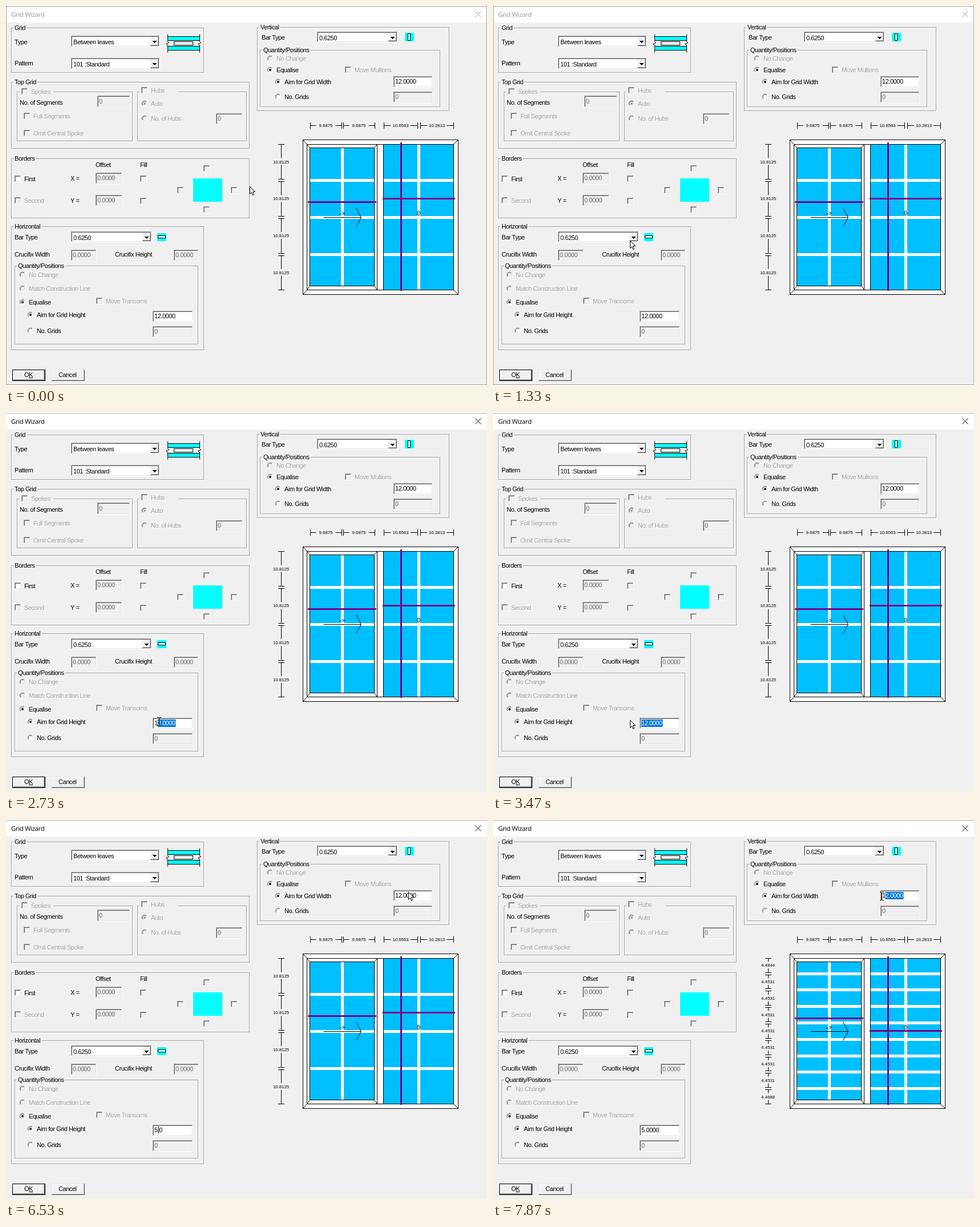
An HTML page with a canvas that plays this animation: 843x664 px, repeating every 8 s.

```html
<!DOCTYPE html>
<html lang="en">
<head>
<meta charset="utf-8">
<title>Grid Wizard</title>
<style>
  html, body { margin: 0; width: 100%; height: 100%; overflow: hidden; background: #f0f0f0; }
  canvas { display: block; }
</style>
</head>
<body>
<canvas id="stage" width="843" height="664"></canvas>
<script>
const ctx = document.getElementById('stage').getContext('2d');
const LOOP = 8000, STEP = 200 / 3;
const FACE = '#f0f0f0', GREY = '#a0a0a0', DARK = '#696969', LIGHT = '#e3e3e3';
const CYAN = '#00ffff', GLASS = '#00bfff', PURPLE = '#800080';
const UI_FONT = '11px "Liberation Sans", sans-serif';

// Cursor keys: time, x, y, shape ("I" is the text beam)
const cursorKeys = [
  [0, 427, 316], [467, 427, 316], [733, 385, 401], [1133, 236, 445], [1333, 240, 411],
  [1400, 240, 411], [2067, 281, 546], [2200, 293, 543], [2400, 293, 543],
  [2467, 299, 540, 'I'], [2933, 244, 540, 'I'], [3467, 240, 538],
  [6000, 240, 538], [6200, 420, 370], [6400, 655, 165], [6533, 705, 126], [6600, 705, 126],
  [6933, 723, 119], [7333, 719, 130], [7400, 721, 133, 'I'], [7467, 721, 133, 'I'],
  [7733, 691, 133, 'I'], [7867, 681, 133, 'I'], [8000, 681, 133, 'I']
];

function cursorAt(t) {
  const time = Math.floor((t + 5) / STEP) * STEP + 0.5;
  let i = 0;
  while (i < cursorKeys.length - 2 && time >= cursorKeys[i + 1][0]) i++;
  const [t0, x0, y0, shape] = cursorKeys[i], [t1, x1, y1, nextShape] = cursorKeys[i + 1];
  const k = shape === nextShape ? Math.min(1, (time - t0) / (t1 - t0)) : 0;
  return { x: Math.round(x0 + (x1 - x0) * k), y: Math.round(y0 + (y1 - y0) * k), beam: shape === 'I' };
}

function rect(x, y, w, h, color) {
  ctx.fillStyle = color;
  ctx.fillRect(x, y, w, h);
}
function path(points, stroke, fill) {
  ctx.beginPath();
  points.forEach(([x, y]) => ctx.lineTo(x + 0.5, y + 0.5));
  if (fill) { ctx.closePath(); ctx.fillStyle = fill; ctx.fill(); }
  if (stroke) { ctx.strokeStyle = stroke; ctx.lineWidth = 1; ctx.stroke(); }
}
function frame(x0, y0, x1, y1, color, fill) {
  if (fill) rect(x0, y0, x1 - x0, y1 - y0, fill);
  ctx.strokeStyle = color;
  ctx.lineWidth = 1;
  ctx.strokeRect(x0 + 0.5, y0 + 0.5, x1 - x0, y1 - y0);
}
function text(str, x, midY, color = '#000', font = UI_FONT, spacing = -0.45) {
  ctx.font = font;
  ctx.letterSpacing = spacing + 'px';
  ctx.fillStyle = color;
  ctx.fillText(str, x, midY + 4);
}
function label(str, x, midY, disabled) {
  if (disabled) text(str, x + 1, midY + 1, '#fff');
  text(str, x, midY, disabled ? GREY : '#000');
}
function bevel(x0, y0, x1, y1, outer, inner, outerLow, innerLow, fill) {
  const w = x1 - x0, h = y1 - y0;
  rect(x0, y0, w, h, outerLow);
  rect(x0, y0, w - 1, h - 1, outer);
  rect(x0 + 1, y0 + 1, w - 2, h - 2, innerLow);
  rect(x0 + 1, y0 + 1, w - 3, h - 3, inner);
  rect(x0 + 2, y0 + 2, w - 4, h - 4, fill);
}
const sunken = (x0, y0, x1, y1, fill) => bevel(x0, y0, x1, y1, GREY, DARK, '#fff', LIGHT, fill);
const raised = (x0, y0, x1, y1) => bevel(x0, y0, x1, y1, LIGHT, '#fff', DARK, GREY, FACE);

function group(title, x0, y0, x1, y1, titleX = x0 + 6) {
  frame(x0 + 1, y0 + 1, x1, y1, '#fff');
  frame(x0, y0, x1 - 1, y1 - 1, GREY);
  ctx.font = UI_FONT;
  ctx.letterSpacing = '-0.45px';
  rect(titleX - 2, y0 - 1, ctx.measureText(title).width + 4, 3, FACE);
  label(title, titleX, y0);
}
function edit(str, x0, y0, x1, y1, enabled, selectFrom = str.length) {
  sunken(x0, y0, x1, y1, enabled ? '#fff' : FACE);
  const x = x0 + 3, midY = Math.round((y0 + y1) / 2) - 1;
  text(str, x, midY, enabled ? '#000' : DARK);
  if (selectFrom >= str.length) return;
  const start = x + ctx.measureText(str.slice(0, selectFrom)).width;
  rect(start, midY - 6, ctx.measureText(str.slice(selectFrom)).width + 1, 13, '#0078d7');
  text(str.slice(selectFrom), start, midY, '#fff');
}
// First character covered when a drag reaches x
function selectionStart(str, textX, x) {
  ctx.font = UI_FONT;
  ctx.letterSpacing = '-0.45px';
  let i = 0;
  while (i < str.length && textX + ctx.measureText(str.slice(0, i + 1)).width - 3 < x) i++;
  return i;
}
function combo(str, x0, y0, x1, y1) {
  sunken(x0, y0, x1, y1, '#fff');
  text(str, x0 + 4, (y0 + y1) / 2 + 1);
  raised(x1 - 17, y0 + 2, x1 - 2, y1 - 2);
  const x = x1 - 10, y = Math.round((y0 + y1) / 2) - 1;
  for (let i = 0; i < 4; i++) rect(x - 3 + i, y + i, 7 - 2 * i, 1, '#000');
}
function check(x, y, str, enabled) {
  sunken(x, y, x + 12, y + 12, enabled ? '#fff' : FACE);
  if (str) label(str, x + 17, y + 6, !enabled);
}
function radio(x, y, str, on, disabled) {
  ctx.lineWidth = 1;
  const arc = (r, start, color) => {
    ctx.beginPath();
    ctx.arc(x, y, r, start, start + Math.PI);
    ctx.strokeStyle = color;
    ctx.stroke();
  };
  ctx.beginPath();
  ctx.arc(x, y, 5, 0, 7);
  ctx.fillStyle = disabled ? FACE : '#fff';
  ctx.fill();
  arc(5, Math.PI * 0.75, GREY);
  arc(4, Math.PI * 0.75, DARK);
  arc(5, -Math.PI / 4, '#fff');
  arc(4, -Math.PI / 4, LIGHT);
  if (on) {
    ctx.beginPath();
    ctx.arc(x, y, 2, 0, 7);
    ctx.fillStyle = disabled ? GREY : '#000';
    ctx.fill();
  }
  label(str, x + 11, y, disabled);
}

function drawTitleBar(active) {
  const ink = active ? '#000' : '#999';
  rect(0, 0, 843, 664, FACE);
  rect(0, 0, 843, 29, '#fff');
  text('Grid Wizard', 9, 15, ink, '11.5px "Open Sans", sans-serif', -0.4);
  path([[822, 9], [832, 19]], ink);
  path([[832, 9], [822, 19]], ink);
  if (active) rect(0, 0, 843, 1, '#b4b4b4');
  else frame(0, 0, 842, 663, '#a6a6a6');
}

function drawLeftForm(height) {
  group('Grid', 9, 38, 347, 117);
  label('Type', 15, 63);
  combo('Between leaves', 114, 52, 270, 72);
  label('Pattern', 15, 100);
  combo('101 :Standard', 114, 91, 270, 111);
  for (const y of [53, 70]) {
    rect(283, y, 56, 8, CYAN);
    rect(283, y, 56, 1, '#000');
    rect(283, y + 7, 56, 1, '#000');
  }
  frame(294, 62, 327, 68, '#000', '#fff');
  for (const x of [283, 339])
    path([[x, 49], [x, 62], [x + 2, 64], [x - 3, 66], [x, 68], [x, 81]], '#000');

  group('Top Grid', 9, 133, 427, 250);
  group('', 19, 150, 222, 237);
  rect(25, 149, 58, 3, FACE);
  check(27, 144, 'Spokes');
  label('No. of Segments', 24, 169);
  edit('0', 160, 157, 218, 178);
  check(31, 187, 'Full Segments');
  check(31, 217, 'Omit Central Spoke');
  group('', 230, 150, 422, 237);
  rect(236, 149, 66, 3, FACE);
  check(237, 142, 'Hubs');
  radio(243, 171, 'Auto', true, true);
  radio(243, 197, 'No. of Hubs', false, true);
  edit('0', 368, 188, 415, 208);

  group('Borders', 9, 267, 427, 372);
  label('Offset', 157, 278);
  label('Fill', 235, 278);
  check(15, 297, 'First', true);
  check(15, 335, 'Second');
  [['X =', 302], ['Y =', 341]].forEach(([name, y]) => {
    label(name, 113, y);
    edit('0.0000', 157, y - 10, 204, y + 10);
    check(235, y - 5);
  });
  rect(328, 302, 51, 41, CYAN);
  check(346, 279);
  check(300, 317);
  check(394, 317);
  check(346, 351);

  group('Horizontal', 9, 386, 347, 603);
  label('Bar Type', 15, 405);
  combo('0.6250', 114, 395, 256, 414);
  rect(265, 398, 16, 14, CYAN);
  frame(266, 402, 279, 406, '#000', '#fff');
  label('Crucifix Width', 15, 435);
  edit('0.0000', 114, 427, 159, 447);
  label('Crucifix Height', 191, 435);
  edit('0.0000', 294, 427, 338, 447);
  group('Quantity/Positions', 15, 455, 337, 593);
  radio(29, 471, 'No Change', false, true);
  radio(29, 495, 'Match Construction Line', false, true);
  radio(29, 519, 'Equalise', true);
  check(158, 511, 'Move Transoms');
  radio(43, 541, 'Aim for Grid Height', true);
  edit(height.str, 257, 534, 328, 554, true, height.selectFrom);
  if (height.caret) rect(267, 537, 1, 12, '#000');
  radio(43, 569, 'No. Grids', false);
  edit('0', 257, 561, 328, 581);

  rect(11, 637, 58, 20, '#000');
  raised(12, 638, 68, 656);
  text('OK', 32, 646);
  rect(40, 651, 7, 1, '#000');
  raised(80, 637, 138, 657);
  text('Cancel', 92, 646);
}

function drawVerticalForm(widthSelect) {
  group('Vertical', 440, 37, 777, 184);
  label('Bar Type', 448, 55);
  combo('0.6250', 545, 45, 687, 64);
  rect(699, 47, 16, 15, CYAN);
  frame(704, 48, 708, 60, '#000', '#fff');
  group('Quantity/Positions', 445, 77, 761, 177);
  radio(463, 92, 'No Change', false, true);
  radio(463, 112, 'Equalise', true);
  check(594, 106, 'Move Mullions');
  radio(477, 133, 'Aim for Grid Width', true);
  edit('12.0000', 679, 123, 748, 143, true, widthSelect);
  radio(477, 159, 'No. Grids', false);
  edit('0', 679, 150, 748, 170);
}

function dimension(str, from, to, vertical) {
  const mid = (from + to) / 2, gap = vertical ? 6 : 17;
  const bar = (pos, size, cross, thick) => vertical
    ? rect(482 - cross, pos, thick, size, '#000')
    : rect(pos, 209 - cross, size, thick, '#000');
  for (const end of [from, to]) bar(Math.round(end), 1, 5, 11);
  bar(from, Math.max(0, mid - gap - from), 0, 1);
  bar(mid + gap, Math.max(0, to - mid - gap), 0, 1);
  ctx.textAlign = 'center';
  text(str, vertical ? 482 : mid, vertical ? mid - 1 : 208, '#000', '8px "Liberation Sans", sans-serif', -0.1);
  ctx.textAlign = 'left';
}

function drawWindow(fine) {
  const bars = Array.from({ length: fine ? 8 : 3 }, (_, i) => fine ? 268.5 + 28.8 * i : 305 + 64.75 * i);
  const stops = [242, ...bars, 497];
  dimension('9.6875', 533, 588);
  dimension('9.6875', 591, 646);
  dimension('10.6563', 662, 721);
  dimension('10.2813', 726, 784);
  bars.concat(497).forEach((_, i) => {
    const value = !fine ? '10.8125' : i === 0 ? '4.4844' : i === 8 ? '4.4688' : '4.4531';
    dimension(value, stops[i] + (i ? 2 : 0), stops[i + 1] - (stops[i + 1] < 497 ? 2 : 0), true);
  });

  frame(520, 234, 792, 505, '#000', '#fff');
  frame(527, 242, 784, 497, '#000');
  for (const [x, innerX] of [[520, 527], [792, 784]]) {
    path([[x, 234], [innerX, 242]], '#000');
    path([[x, 505], [innerX, 497]], '#000');
  }
  frame(527, 242, 650, 497, '#000');
  for (const [x, innerX] of [[527, 532], [650, 645]]) {
    path([[x, 242], [innerX, 248]], '#000');
    path([[x, 497], [innerX, 490]], '#000');
  }
  for (const [x0, y0, x1, y1, barX] of [[532, 248, 645, 490, 587], [661, 242, 784, 497, 721]]) {
    rect(x0, y0, x1 - x0, y1 - y0, GLASS);
    rect(barX, y0, 5, y1 - y0, '#fff');
    bars.forEach(y => rect(x0, Math.round(y) - 2, x1 - x0, 5, '#fff'));
    frame(x0, y0, x1, y1, '#000');
  }
  rect(529, fine ? 346 : 342, 120, 3, PURPLE);
  rect(660, fine ? 368 : 336, 127, 3, PURPLE);
  rect(691, 239, 3, 260, PURPLE);
  path([[556, 370], [622, 370]], '#000');
  path([[613, 353], [622, 370], [613, 386]], '#000');
  text('->', 584, 363, '#000', UI_FONT, 0);
  text('0', 720, 363, '#000', UI_FONT, 0);
}

function drawCursor({ x, y, beam }) {
  if (beam) {
    for (const top of [y - 7, y + 7]) {
      rect(x - 3, top, 3, 1, '#000');
      rect(x + 1, top, 3, 1, '#000');
    }
    rect(x, y - 6, 1, 13, '#000');
    return;
  }
  const outline = [[0, 0], [0, 13], [3, 10], [5, 15], [7, 14], [5, 9], [9, 9], [0, 0]];
  path(outline.map(([dx, dy]) => [x + dx, y + dy]), '#000', '#fff');
}

function draw(t) {
  const cursor = cursorAt(t), full = '12.0000';
  const applied = t >= 7530;
  const height = { str: applied ? '5.0000' : t >= 5670 ? '5.0' : full };
  height.caret = t >= 5670 && t < 6730;
  if (t >= 2470 && t < 5670) height.selectFrom = t >= 2900 ? 0 : selectionStart(full, 260, cursor.x);
  const widthSelect = applied ? selectionStart(full, 682, cursor.x + 5) : undefined;

  drawTitleBar(t >= 2470 || (t >= 200 && t < 270));
  drawLeftForm(height);
  drawVerticalForm(widthSelect);
  drawWindow(applied);
  drawCursor(cursor);
}

function tick() {
  draw(performance.now() % LOOP);
  requestAnimationFrame(tick);
}
tick();
</script>
</body>
</html>
```
